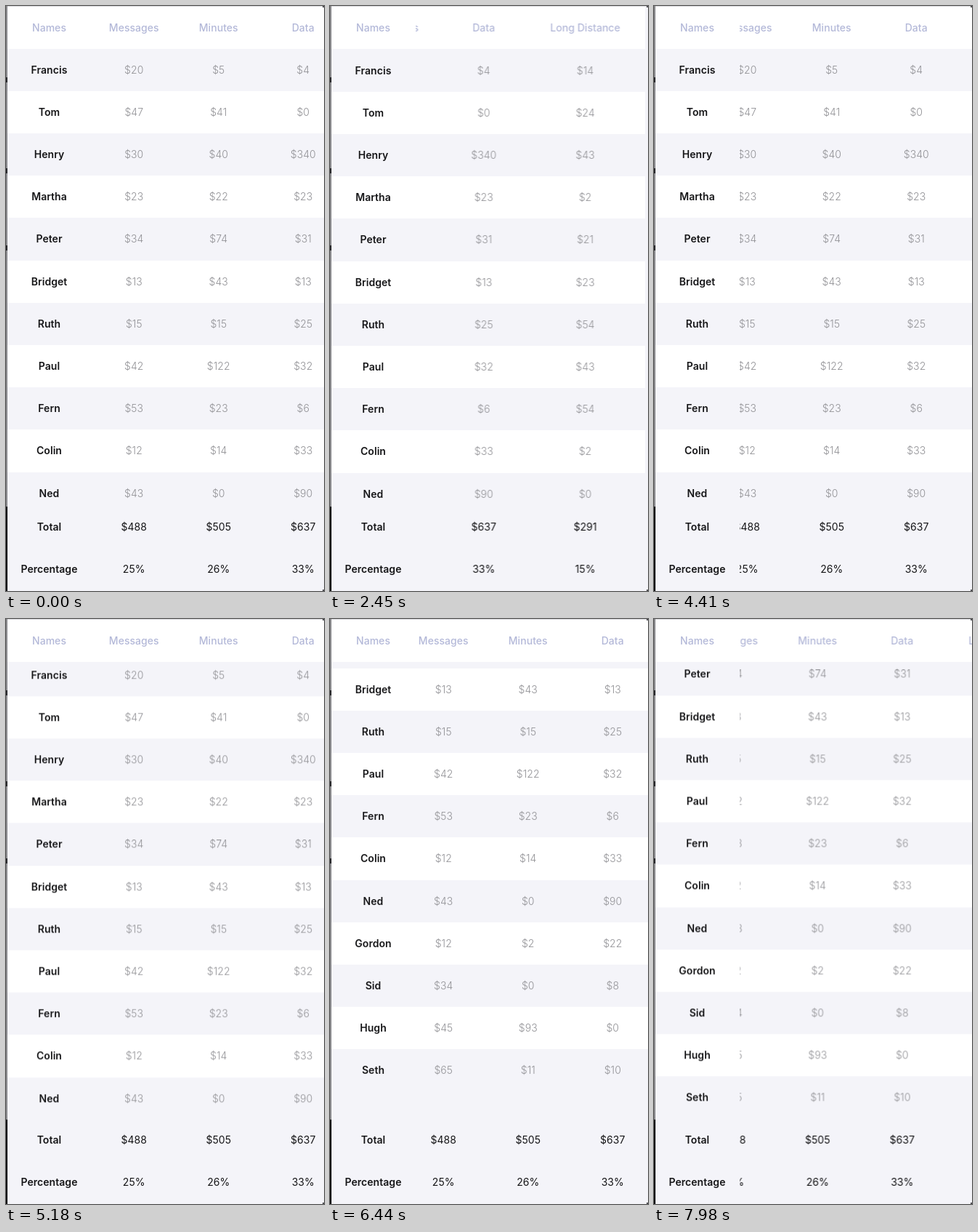
Animation, 438 px wide and 804 px high, one loop 8000 ms. Source, as an HTML page:

```html
<!DOCTYPE html>
<html lang="en">
<head>
<meta charset="utf-8">
<title>Scrolling cost table</title>
<style>
  :root { --row: 58.2px; --shade: #f4f4f9; }
  html, body { margin: 0; width: 100%; height: 100%; overflow: hidden; background: var(--shade); }
  #stage {
    position: relative; width: 438px; height: 804px; overflow: hidden;
    background: var(--shade); color: #161618;
    font: 400 14px/var(--row) Inter, Roboto, sans-serif;
    letter-spacing: .05px; text-align: center; white-space: nowrap;
  }
  section { position: absolute; left: 0; width: 438px; overflow: hidden; }
  .head { top: 0; height: 58.7px; line-height: 59.6px; color: #b3b8d8; font-weight: 500; }
  .body { top: 58.7px; height: 628.5px; }
  .foot { top: 687.2px; height: 116.8px; }

  .block { position: relative; height: 100%; }
  .names { position: absolute; left: 1px; top: 0; width: 117px; }
  .clip { position: absolute; left: 118px; top: 0; width: 320px; height: 100%; overflow: hidden; }
  .cells { width: 512.5px; animation: pan-x 8s infinite; }
  .line { display: flex; height: var(--row); }
  .head .line { height: 58.7px; background: #fff; }
  .body .line:nth-child(even) { background: #fff; }
  .line span { flex: 0 0 116.5px; }
  .line span:last-child { flex-basis: 163px; }
  .names .line span { flex-basis: 117px; }
  .body .names, .foot .names { font-weight: 600; }
  .body .cells { color: #929296; font-weight: 300; }
  .body .block { height: 873px; animation: pan-y 8s infinite; }

  .edge { position: absolute; left: 0; top: 0; width: 1.5px; height: 804px;
    background: linear-gradient(#8b8b8e 688px, #08080a 0); }
  .edge i { position: absolute; left: 0; width: 1.5px; height: 7px; background: #29292c; }
  .top { position: absolute; left: 0; top: 0; width: 438px; height: 1px; background: #dcdce0; }
  .corner { position: absolute; right: 0; width: 2px; height: 2px; background: #55555a; }

  @keyframes pan-x {
    0% { transform: translateX(0); animation-timing-function: ease-in-out; }
    5% { transform: translateX(-8px); animation-timing-function: ease-in-out; }
    10.5% { transform: translateX(0); animation-timing-function: linear; }
    18.5% { transform: translateX(0); animation-timing-function: cubic-bezier(.5, 0, .75, .6); }
    23.625% { transform: translateX(-140.5px); animation-timing-function: cubic-bezier(.2, .5, .5, 1); }
    28% { transform: translateX(-200px); animation-timing-function: ease-in-out; }
    30.625% { transform: translateX(-197.5px); animation-timing-function: ease-out; }
    35% { transform: translateX(-192.5px); animation-timing-function: linear; }
    45.5% { transform: translateX(-192.5px); animation-timing-function: ease-in; }
    48.125% { transform: translateX(-188.5px); animation-timing-function: cubic-bezier(.4, .1, .3, 1); }
    62% { transform: translateX(0); animation-timing-function: linear; }
    72% { transform: translateX(0); animation-timing-function: cubic-bezier(.4, 0, .7, .7); }
    80.5% { transform: translateX(-20px); animation-timing-function: linear; }
    85% { transform: translateX(-28px); animation-timing-function: ease-in-out; }
    99.75%, 100% { transform: translateX(-67.5px); }
  }
  @keyframes pan-y {
    0%, 18.5% { transform: translateY(0); animation-timing-function: ease-in-out; }
    23.625% { transform: translateY(-3px); animation-timing-function: ease-in-out; }
    30.625% { transform: translateY(1px); animation-timing-function: ease-out; }
    35%, 62.5% { transform: translateY(0); animation-timing-function: ease-in; }
    64.75% { transform: translateY(-10.5px); animation-timing-function: cubic-bezier(.3, .25, .4, 1); }
    78% { transform: translateY(-286px); animation-timing-function: ease-in-out; }
    80.5% { transform: translateY(-282px); animation-timing-function: cubic-bezier(.3, .3, .3, 1); }
    89%, 100% { transform: translateY(-244.6px); }
  }
</style>
</head>
<body>
<div id="stage"></div>
<script>
  const people = [
    ['Francis', 20, 5, 4, 14], ['Tom', 47, 41, 0, 24], ['Henry', 30, 40, 340, 43],
    ['Martha', 23, 22, 23, 2], ['Peter', 34, 74, 31, 21], ['Bridget', 13, 43, 13, 23],
    ['Ruth', 15, 15, 25, 54], ['Paul', 42, 122, 32, 43], ['Fern', 53, 23, 6, 54],
    ['Colin', 12, 14, 33, 2], ['Ned', 43, 0, 90, 0], ['Gordon', 12, 2, 22, 3],
    ['Sid', 34, 0, 8, 0], ['Hugh', 45, 93, 0, 6], ['Seth', 65, 11, 10, 2]
  ];
  const sums = [1, 2, 3, 4].map(col => people.reduce((sum, row) => sum + row[col], 0));
  const grand = sums.reduce((a, b) => a + b);
  const dollars = values => values.map(v => '$' + v);

  const line = texts => `<div class="line">${texts.map(t => `<span>${t}</span>`).join('')}</div>`;
  const section = (kind, rows) => `<section class="${kind}"><div class="block">
    <div class="names">${rows.map(([name]) => line([name])).join('')}</div>
    <div class="clip"><div class="cells">${rows.map(([, ...rest]) => line(rest)).join('')}</div></div>
  </div></section>`;

  document.getElementById('stage').innerHTML =
    section('body', people.map(([name, ...costs]) => [name, ...dollars(costs)])) +
    section('head', [['Names', 'Messages', 'Minutes', 'Data', 'Long Distance']]) +
    section('foot', [
      ['Total', ...dollars(sums)],
      ['Percentage', ...sums.map(s => Math.round(s / grand * 100) + '%')]
    ]) +
    `<div class="top"></div>
     <div class="edge">${[98, 223, 329].map(y => `<i style="top:${y}px"></i>`).join('')}</div>
     <div class="corner" style="top:0"></div><div class="corner" style="bottom:0"></div>`;
</script>
</body>
</html>
```
